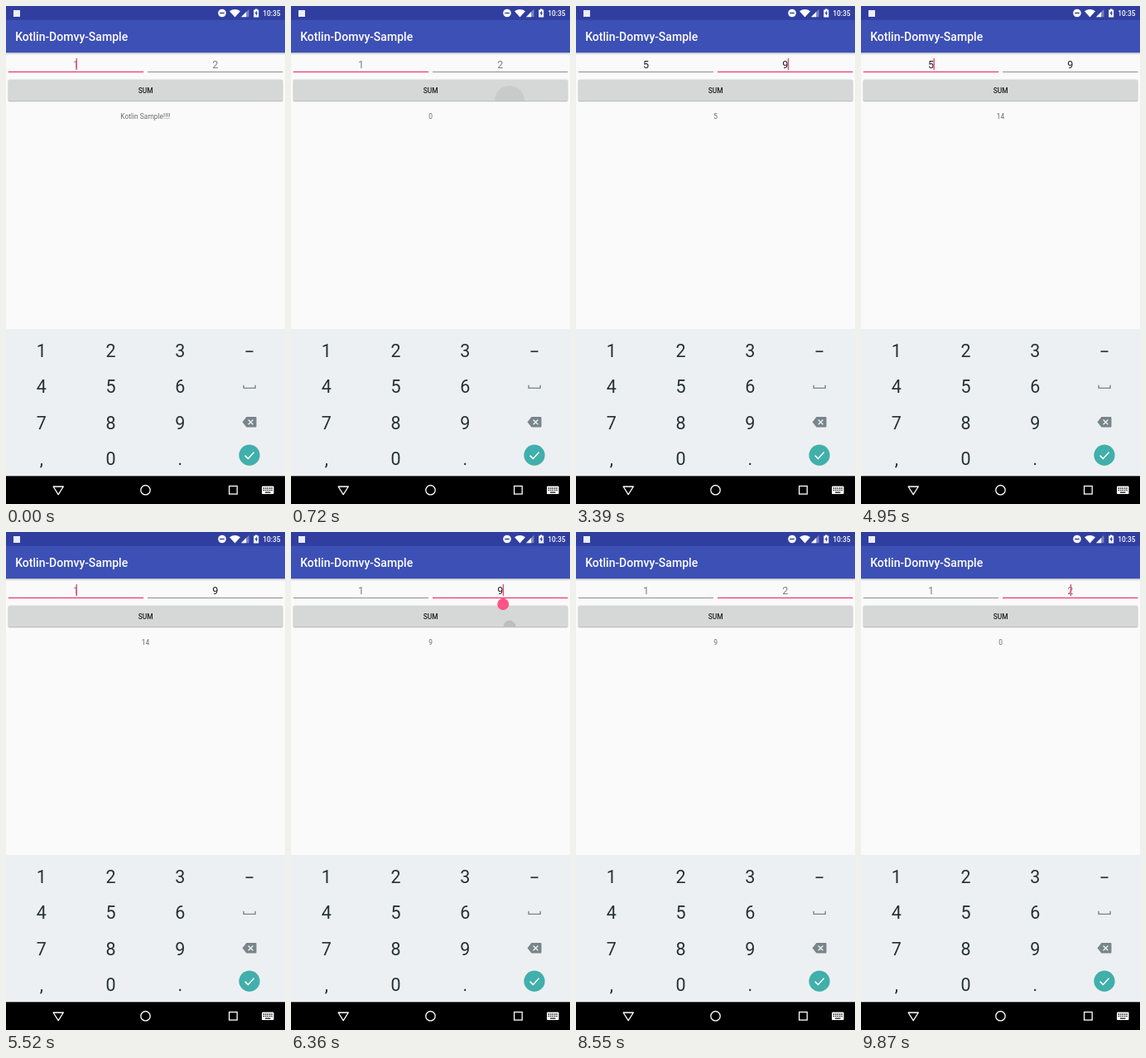
These frames come from a looping animation (337 px wide and 600 px high, 9.9 s). An HTML page:

```html
<!DOCTYPE html>
<html lang="en">
<head>
<meta charset="utf-8">
<title>Kotlin sum sample</title>
<style>
  html, body { margin: 0; width: 100%; height: 100%; overflow: hidden; background: #fafafa; }
  svg { display: block; width: 100vw; height: 100vh; font-family: Roboto, sans-serif; }
  .mid { text-anchor: middle; }
  .input { font-size: 12.64px; }
  .keys { font-size: 21.5px; fill: #263238; }
</style>
</head>
<body>
<svg viewBox="0 0 337 600">
  <defs>
    <clipPath id="buttonClip"><rect x="2.8" y="88.5" width="331.4" height="25.4" rx="1.4"/></clipPath>
    <linearGradient id="barShadow" x2="0" y2="1">
      <stop stop-color="#000" stop-opacity=".2"/><stop offset="1" stop-color="#000" stop-opacity="0"/>
    </linearGradient>
  </defs>
  <rect width="337" height="600" fill="#fafafa"/>

  <!-- status and title bars -->
  <rect y="16" width="337" height="40.2" fill="#3d50b6"/>
  <rect width="337" height="16.8" fill="#303f9f"/>
  <rect y="56.2" width="337" height="2.8" fill="url(#barShadow)"/>
  <g fill="#fff">
    <rect x="9" y="5" width="8" height="8" opacity=".9"/>
    <circle cx="261" cy="8.5" r="4.8"/>
    <rect x="258.2" y="7.8" width="5.6" height="1.4" fill="#303f9f"/>
    <path d="M270 6.2Q276.5 1.6 283 6.2L276.5 13.4Z"/>
    <path d="M284 13.3L293.5 3.8V13.3Z" opacity=".35"/>
    <path d="M284 13.3L290.2 7.1V13.3Z"/>
    <path d="M299.2 4.5H301V3.4H303.4V4.5H305.2V13.4H299.2Z"/>
    <path d="M302.9 5.6L300.4 9.3H301.9V12L304.1 8.3H302.9Z" fill="#303f9f"/>
    <text x="310.3" y="11.7" font-size="8.42" font-weight="500">10:35</text>
    <text x="11.2" y="41.6" font-size="14.04" font-weight="500">Kotlin-Domvy-Sample</text>
  </g>

  <!-- form -->
  <g id="fields"></g>
  <rect x="2.4" y="89" width="332.2" height="26.6" rx="1.8" fill="#000" opacity=".1"/>
  <rect x="2.8" y="89" width="331.4" height="25.8" rx="1.4" fill="#000" opacity=".2"/>
  <rect x="2.8" y="88.5" width="331.4" height="25.4" rx="1.4" fill="#d6d7d7"/>
  <circle id="ripple" cx="264" cy="114" clip-path="url(#buttonClip)"/>
  <text class="mid" x="168.7" y="104.6" font-size="8.42" font-weight="500" fill="#222">SUM</text>
  <text id="result" class="mid" x="168.5" y="135.7" font-size="8.42" fill="#6c6c6c"></text>
  <path id="handle" d="M256.2 78.6L261.3 82.2A7 7 0 1 1 251.1 82.2Z" fill="#ff5287"/>

  <!-- keyboard -->
  <rect y="389" width="337" height="178" fill="#edf0f2"/>
  <rect id="press" width="83.8" height="43.4" fill="#d9dde2"/>
  <g id="keys" class="keys mid"></g>
  <rect x="289.5" y="415.4" width="9" height="1.7" fill="#263238"/>
  <path d="M287.1 456.8V460.4H301.1V456.8" fill="none" stroke="#78858b" stroke-width="1.4"/>
  <path d="M290.5 495H301.5Q302.5 495 302.5 496V506.6Q302.5 507.6 301.5 507.6H290.5L285.5 501.3Z" fill="#78858b"/>
  <path d="M292.6 498.4L298.4 504.2M298.4 498.4L292.6 504.2" stroke="#edf0f2" stroke-width="1.4"/>
  <circle cx="294" cy="541.2" r="12.6" fill="#41afab"/>
  <path d="M288.6 541.6L292.4 545.4L299.6 537.6" fill="none" stroke="#fff" stroke-width="1.5"/>

  <!-- navigation bar -->
  <rect y="566.3" width="337" height="33.7" fill="#000"/>
  <g fill="none" stroke="#fff" stroke-width="1.3">
    <path d="M57.1 579H69.3L63.2 588.6Z" stroke-linejoin="round"/>
    <circle cx="168.5" cy="583.2" r="5.7"/>
    <rect x="269.6" y="578.4" width="9.6" height="9.6"/>
  </g>
  <rect x="309" y="578.6" width="14.5" height="9.4" rx="1" fill="#fff"/>
  <path d="M310.8 581H322M310.8 583.4H322" stroke="#000" stroke-width="1.3" stroke-dasharray="1.3 1.1"/>
  <path d="M313 586H319.5" stroke="#000" stroke-width="1.2"/>
</svg>
<script>
const LOOP = 9900, BLINK = 500, RIPPLE = 420;
const KEY_W = 83.8, KEY_H = 43.4, KEYS_X = 0.9, KEYS_Y = 393;
const $ = id => document.getElementById(id);

function add(parent, tag, attrs, text = '') {
  const el = document.createElementNS('http://www.w3.org/2000/svg', tag);
  set(el, attrs);
  el.textContent = text;
  parent.append(el);
  return el;
}
function set(el, attrs) {
  for (const k in attrs) el.setAttribute(k, attrs[k]);
}
const keyPos = (col, row) => ({ x: KEYS_X + KEY_W * col, y: KEYS_Y + KEY_H * row });

['123', '456', '789', ',0.'].forEach((row, r) => [...row].forEach((key, c) => {
  const { x, y } = keyPos(c, r);
  add($('keys'), 'text', { x: x + KEY_W / 2, y: y + 30 }, key);
}));

const fields = [84.5, 252.7].map((x, i) => ({
  x,
  hint: String(i + 1),
  line: add($('fields'), 'rect', { x: x - 81.7, width: 163.4 }),
  text: add($('fields'), 'text', { x, y: 75, class: 'input mid' }),
  cursor: add($('fields'), 'rect', { y: 63, width: 1.4, height: 14, fill: '#e8487e' })
}));

// Each step changes some of the state; `blink` restarts the cursor, `tap` starts a ripple.
const steps = [
  [0, { values: ['', ''], focus: 0, result: 'Kotlin Sample!!!!', key: null, handle: false, blink: true }],
  [510, { result: '0', tap: true }],
  [1620, { key: [1, 1] }],
  [1770, { key: null, values: ['5', ''], blink: true }],
  [2010, { result: '5', tap: true }],
  [2640, { focus: 1, blink: true }],
  [3210, { key: [2, 2] }],
  [3330, { key: null, values: ['5', '9'], blink: true }],
  [3720, { result: '14', tap: true }],
  [4500, { focus: 0, blink: true }],
  [5310, { key: [3, 2] }],
  [5430, { key: null, values: ['', '9'], blink: true }],
  [5910, { focus: 1, handle: true, blink: true }],
  [6320, { result: '9', tap: true, blink: true }],
  [7710, { key: [3, 2] }],
  [7860, { key: null, values: ['', ''], handle: false, blink: true }],
  [8610, { result: '0', tap: true }]
];

function stateAt(t) {
  const s = { blinkAt: 0, tapAt: -LOOP };
  for (const [at, change] of steps) {
    if (at > t) break;
    Object.assign(s, change);
    if (change.blink) s.blinkAt = at;
    if (change.tap) s.tapAt = at;
  }
  return s;
}

function draw(t) {
  const s = stateAt(t);
  const cursorOn = Math.floor((t - s.blinkAt) / BLINK) % 2 === 0;

  fields.forEach((f, i) => {
    const value = s.values[i], active = s.focus === i;
    f.text.textContent = value || f.hint;
    set(f.text, { fill: value ? '#212121' : '#808080' });
    set(f.line, active
      ? { y: 78.7, height: 1.4, fill: '#e8487e' }
      : { y: 78.9, height: 1, fill: '#8c8c8c' });
    set(f.cursor, { x: f.x + (value ? 3 : 0), opacity: active && cursorOn ? 1 : 0 });
  });

  $('result').textContent = s.result;
  set($('handle'), { opacity: s.handle ? 1 : 0 });
  set($('press'), { opacity: s.key ? 1 : 0 });
  if (s.key) set($('press'), keyPos(...s.key));

  const p = Math.min(1, (t - s.tapAt) / RIPPLE);
  set($('ripple'), { r: 5 + 26 * p, opacity: 0.13 * (1 - p) });
}

function tick() {
  draw(performance.now() % LOOP);
  requestAnimationFrame(tick);
}
tick();
</script>
</body>
</html>
```
